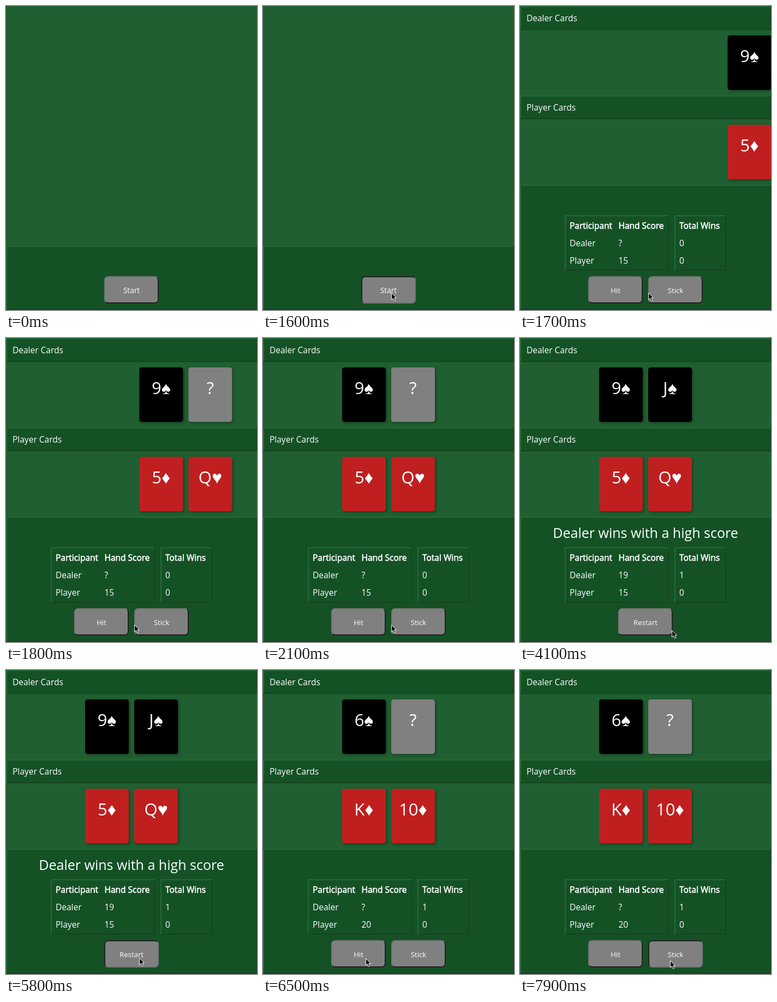
An HTML page for the animation above (8 s loop, 460 by 558 pixels).

```html
<!DOCTYPE html>
<html lang="en">
<head>
<meta charset="utf-8">
<title>Card table</title>
<style>
  html, body { margin: 0; width: 100%; height: 100%; overflow: hidden; background: #205f31; }
  svg { display: block; width: 460px; height: 558px; font-family: "Open Sans", "Noto Sans", sans-serif; }
  text { fill: #fff; white-space: pre; }
  .suit { font-family: "Liberation Sans", sans-serif; font-size: 32px; }
  .card { filter: drop-shadow(2px 2px 2px rgba(0, 0, 0, .35)); }
  .bold { stroke: #fff; stroke-width: .6px; }
</style>
</head>
<body>
<svg id="stage" viewBox="0 0 460 558"></svg>
<script>
const LOOP = 8000, STEP = 100;
const stage = document.getElementById('stage');

// Pointer stops: time, x, y. A fourth value glides there from the previous stop.
const stops = [
  [900, 346, 541], [1200, 232, 524, 'glide'], [1300, 235, 526],
  [2700, 235, 526], [3300, 273, 536, 'glide'],
  [4100, 278, 536], [4700, 272, 536], [4900, 276, 536], [5100, 243, 528, 'glide'],
  [5800, 244, 528], [6000, 243, 528], [6300, 243, 528], [6500, 188, 529, 'glide'],
  [6900, 188, 529], [7300, 274, 533, 'glide'], [7600, 275, 533]
];

const rounds = {
  first: { dealer: ['9♠', '?'], player: ['5♦', 'Q♥'], scores: ['?', 15], wins: [0, 0] },
  lost: { dealer: ['9♠', 'J♠'], player: ['5♦', 'Q♥'], scores: [19, 15], wins: [1, 0],
          message: 'Dealer wins with a high score' },
  second: { dealer: ['6♠', '?'], player: ['K♦', '10♦'], scores: ['?', 20], wins: [1, 0] }
};

function text(x, y, str, size = 15.5, attrs = '') {
  return `<text x="${x}" y="${y}" font-size="${size}" ${attrs}>${str}</text>`;
}

const centered = (x, y, str, size) => text(x, y, str, size, 'text-anchor="middle"');

function panel(x, y, w, h) {
  return `<g transform="translate(${x} ${y})">
    <rect width="${w}" height="${h}" fill="#145226"/>
    <path d="M0 ${h}V0H${w}l-2 2H2V${h - 2}z" fill="#216a38"/>
    <path d="M0 ${h}H${w}V0l-2 2V${h - 2}H2z" fill="#16451f"/></g>`;
}

function button(x, label, pressed, size = 13.2) {
  const w = 100, h = 50, r = 6, k = r * (1 - Math.SQRT1_2), arc = `A${r} ${r} 0 0 1 `;
  const half = `M${1 + k} ${h - 1 - k}${arc}1 ${h - 1 - r}V${1 + r}${arc}${1 + r} 1` +
    `H${w - 1 - r}${arc}${w - 1 - k} ${1 + k}`;
  const [near, far] = pressed ? ['#222', '#777'] : ['#777', '#222'];
  return `<g transform="translate(${x} 496)" fill="none" stroke-width="2">
    <rect x="1" y="1" width="${w - 2}" height="${h - 2}" rx="${r}" fill="#808080"/>
    <path d="${half}" stroke="${near}"/>
    <path d="${half}" stroke="${far}" transform="rotate(180 ${w / 2} ${h / 2})"/></g>` +
    centered(x + w / 2, 527, label, size);
}

function card(x, y, face) {
  const suit = face === '?' ? '' : face.slice(-1);
  const rank = suit ? face.slice(0, -1) : face;
  const fill = !suit ? '#808080' : suit === '♠' ? '#000' : '#c01f1f';
  return `<rect class="card" x="${x}" y="${y}" width="80" height="100" rx="4.5" fill="${fill}"/>` +
    centered(x + 40, y + 49, `${rank}<tspan class="suit">${suit}</tspan>`, 31);
}

function hand(title, y, cards, shift) {
  return panel(0, y, 460, 44) + text(12, y + 28, title) +
    cards.map((face, i) => card(145 + 90 * i + shift, y + 54, face)).join('');
}

function table(round) {
  const column = (x, head, cells) => text(x, 409, head, 15.5, 'class="bold"') +
    cells.map((cell, i) => text(x, 441 + 32 * i, cell)).join('');
  return panel(82, 384, 191, 102) + panel(283, 384, 95, 102) +
    column(91, 'Participant', ['Dealer', 'Player']) +
    column(180.5, 'Hand Score', round.scores) +
    column(292, 'Total Wins', round.wins);
}

function pointer(t) {
  const i = stops.findLastIndex(s => s[0] <= t);
  if (i < 0) return '';
  let [t0, x, y] = stops[i];
  const next = stops[i + 1];
  if (next && next[3]) {
    const p = (t - t0) / (next[0] - t0);
    const e = p * (2 - p) * .5 + p * .5;
    x = Math.round(x + (next[1] - x) * e);
    y = Math.round(y + (next[2] - y) * e);
  }
  return `<path transform="translate(${x} ${y})" d="M.5 .7V13.2L3.4 10.5 5.4 15.4 7.7 14.4 5.7 9.7H9.4z"
    fill="#000" stroke="#fff" stroke-width="1"/>`;
}

function scene(t) {
  if (t < 1700) return panel(0, 440, 460, 118) + button(180, 'Start', t >= 1600, 13.6);
  const round = rounds[t < 3500 ? 'first' : t < 5900 ? 'lost' : 'second'];
  const left = Math.max(0, (2100 - t) / 500);
  const shift = 460 * left ** 3;
  const pressed = t === 3400 || t === 5800 || t >= 7900;
  return hand('Dealer Cards', 0, round.dealer, shift) +
    hand('Player Cards', 164, round.player, shift) +
    panel(0, 328, 460, 230) + table(round) +
    (round.message
      ? centered(230, 367, round.message, 25) + button(180, 'Restart', pressed)
      : button(125, 'Hit', false) + button(235, 'Stick', pressed));
}

let shown = -1;
const start = performance.now();

function draw(now) {
  const t = Math.floor(Math.max(0, now - start) % LOOP / STEP) * STEP;
  if (t !== shown) {
    shown = t;
    stage.innerHTML = '<rect width="460" height="558" fill="#205f31"/>' + scene(t) + pointer(t);
  }
  requestAnimationFrame(draw);
}
draw(start);
</script>
</body>
</html>
```
